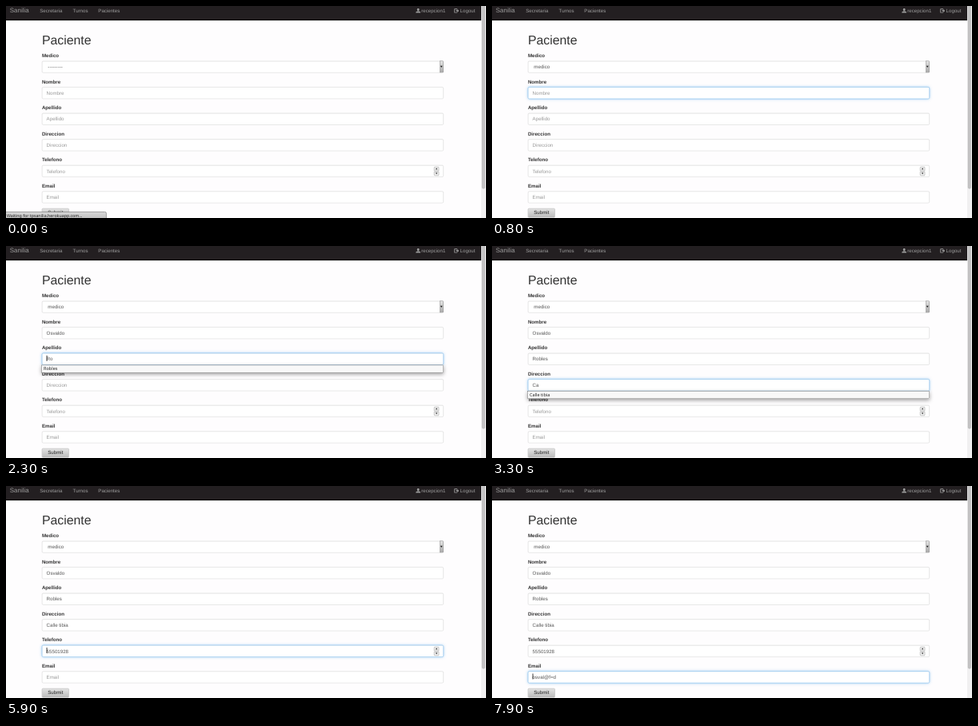
Write an HTML page that moves like this. It is 600 px wide and 265 px high and loops after 8000 ms.

```html
<!DOCTYPE html>
<html lang="es">
<head>
<meta charset="utf-8">
<title>Paciente</title>
<style>
* { box-sizing: border-box; }
html, body { margin: 0; width: 100%; height: 100%; overflow: hidden; background: #fefdfe; }
#page {
  position: absolute; left: 0; top: 0; width: 1364px; height: 603px;
  transform: scale(.44); transform-origin: 0 0;
  font: 14px/20px "Liberation Sans", Arial, sans-serif; color: #333;
  text-rendering: geometricPrecision; white-space: pre;
}
#page * { position: absolute; }
nav { left: 0; top: 0; width: 1350px; height: 41px; background: #231f21; border-bottom: 2px solid #080808; color: #9d9d9d; }
nav span { top: 4px; }
nav .brand { left: 11px; top: 3px; font-size: 18px; }
nav svg { top: 6px; width: 14px; height: 15px; }
h1 { left: 102px; top: 77px; margin: 0; font-size: 36px; line-height: 40px; font-weight: 500; }
label { left: 102px; font-weight: bold; }
.field {
  left: 102px; width: 1141px; height: 34px; padding: 6px 12px;
  background: #fff; border: 1.6px solid #ccc; border-radius: 4px; color: #555;
  box-shadow: inset 0 1px 1px rgba(0,0,0,.075);
}
.field.focus { border-color: #66afe9; box-shadow: inset 0 1px 1px rgba(0,0,0,.075), 0 0 8px rgba(102,175,233,.7); }
.field .text { position: static; }
.field .empty { color: #999; }
.field .caret { position: static; display: inline-block; width: 2px; height: 16px; margin-right: -2px; vertical-align: -3px; background: #222; }
.field.choice { padding-left: 16px; }
.arrow { right: -1px; top: -1px; width: 11px; height: 33px; background: linear-gradient(#e4e4e4, #aaa); border: 1.5px solid #777; }
.arrow::after, .spin i::after { content: ""; position: absolute; border: 3px solid transparent; }
.arrow::after { left: 1px; top: 13px; border-top: 5px solid #111; }
.spin { right: 12px; top: 4px; width: 14px; height: 25px; }
.spin i { left: 0; width: 14px; height: 12px; background: #f2f2f2; border: 1.4px solid #888; border-radius: 2px; }
.spin i::after { left: 2.6px; top: -1px; border-bottom: 4px solid #222; }
.spin i + i { top: 13px; }
.spin i + i::after { top: 3px; border-bottom: 3px solid transparent; border-top: 4px solid #222; }
.popup { left: 101px; width: 1142px; background: #f8f8f8; border: 1.8px solid #666; box-shadow: 0 4px 12px rgba(0,0,0,.4); color: #222; }
#hint { height: 22px; padding-left: 5px; font: 12.5px/19px "Noto Sans", sans-serif; }
#list { top: 190px; height: 63px; font: 14px/30px "Noto Sans", sans-serif; }
#list div { left: 0; width: 100%; height: 30px; padding-left: 11px; }
#list div + div { top: 30px; }
#list .on { background: linear-gradient(#64adf0, #3b8de0); color: #fff; }
#submit {
  left: 102px; top: 575px; width: 77px; height: 26px; text-align: center; line-height: 23px;
  background: linear-gradient(#e2e2e2, #bcbcbc); border: 1.6px solid #999; border-radius: 3px; color: #222;
}
#status {
  left: -2px; top: 584px; width: 288px; height: 24px; padding-left: 2px;
  background: linear-gradient(#d6d6d6, #bebebe); border: 2px solid #909090; border-radius: 0 5px 0 0;
  font: 12px/19px "Noto Sans", sans-serif; color: #222;
}
#bar { left: 1350px; top: 0; width: 14px; height: 603px; background: #f1f0f1; }
#bar i { left: 2px; top: -8px; width: 9px; height: 527px; background: #c3c2c3; border: 1px solid #aaa; border-radius: 4px; }
</style>
</head>
<body>
<div id="page">
  <nav>
    <span class="brand">Sanilia</span>
    <span style="left:96px">Secretaria</span>
    <span style="left:190px">Turnos</span>
    <span style="left:262px">Pacientes</span>
    <svg style="left:1164px" viewBox="0 0 14 14" fill="#9d9d9d"><ellipse cx="7" cy="4" rx="3.2" ry="4"/><path d="M0 13V11Q1 9.6 5 8.5H9Q13 9.6 14 11V13Z"/></svg>
    <span style="left:1180px">recepcion1</span>
    <svg style="left:1273px" viewBox="0 0 14 14" fill="#9d9d9d"><path d="M9 1H2Q0 1 0 3V11Q0 13 2 13H9V11H2V3H9Z"/><path d="M5 5.5H9V2.5L14 7L9 11.5V8.5H5Z"/></svg>
    <span style="left:1290px">Logout</span>
  </nav>
  <h1>Paciente</h1>
  <div id="submit">Submit</div>
  <div id="list" class="popup"><div>---------</div><div>medico</div></div>
  <div id="hint" class="popup"></div>
  <div id="status">Waiting for tpsanilia.herokuapp.com...</div>
  <div id="bar"><i></i></div>
</div>
<script>
const LOOP = 8000, TOP = 155.7, STEP = 74;
const page = document.getElementById('page');
const list = document.getElementById('list');
const hint = document.getElementById('hint');
const status = document.getElementById('status');
const submit = document.getElementById('submit');

const evenly = (start, gap, n) => Array.from({ length: n }, (_, i) => start + i * gap);
const within = (t, spans) => spans.some(([a, b]) => t >= a && t < b);

// keys: when each character lands; focus and hint: [from, to) in ms
const fields = [
  { name: 'Medico', value: 'medico', keys: Array(6).fill(500), focus: [[200, 800]], hint: [] },
  { name: 'Nombre', value: 'Osvaldo', keys: evenly(1100, 100, 7), focus: [[800, 2000]], hint: [[1100, 2000]] },
  { name: 'Apellido', value: 'Robles', keys: evenly(2200, 100, 6), focus: [[2000, 2900]], hint: [[2200, 2900]] },
  { name: 'Direccion', value: 'Calle tibia', keys: [3000, 3200, 4300, ...evenly(4400, 100, 8)],
    focus: [[2900, 3800], [4100, 5200]], hint: [[3000, 3700], [4300, 5200]] },
  { name: 'Telefono', value: '55501928', keys: evenly(5300, 85, 8), focus: [[3800, 4100], [5200, 6000]], hint: [] },
  { name: 'Email', value: 'osval@f=d', keys: [6100, 6200, 6300, 6350, 6400, 6700, 7200, 7700, 7900], focus: [[6000, 8000]], hint: [] }
];
const caretOff = [[3250, 3700], [6800, 6900], [7400, 7600]];

function add(tag, cls, parent, before) {
  const el = document.createElement(tag);
  el.className = cls;
  parent.insertBefore(el, before || null);
  return el;
}

fields.forEach((f, i) => {
  f.top = TOP + i * STEP;
  const label = add('label', '', page, submit);
  label.textContent = f.name;
  label.style.top = f.top - 25 + 'px';
  f.box = add('div', 'field', page, submit);
  f.box.style.top = f.top + 'px';
  f.text = add('span', 'text', f.box);
  f.caret = add('i', 'caret', f.box);
  if (i === 0) {
    f.box.classList.add('choice');
    add('div', 'arrow', f.box);
  }
  if (f.name === 'Telefono') add('div', 'spin', f.box).innerHTML = '<i></i><i></i>';
});

const show = (el, on) => { el.style.display = on ? '' : 'none'; };

function draw(t) {
  let hinted = null;
  fields.forEach((f, i) => {
    const typed = f.value.slice(0, f.keys.filter(k => k <= t).length);
    const focused = within(t, f.focus);
    f.text.textContent = typed || (i ? f.name : '---------');
    f.text.classList.toggle('empty', !typed && i > 0);
    f.box.classList.toggle('focus', focused);
    show(f.caret, i > 0 && focused && typed && !within(t, caretOff));
    if (within(t, f.hint)) hinted = f;
  });
  show(hint, hinted);
  if (hinted) {
    hint.textContent = hinted.value;
    hint.style.top = hinted.top + 34 + 'px';
  }
  show(status, t < 200);
  show(list, t >= 200 && t < 500);
  list.children[0].classList.toggle('on', t < 300);
  list.children[1].classList.toggle('on', t >= 300);
}

const begin = performance.now();
function tick() {
  draw((performance.now() - begin) % LOOP);
  requestAnimationFrame(tick);
}
tick();
</script>
</body>
</html>
```
